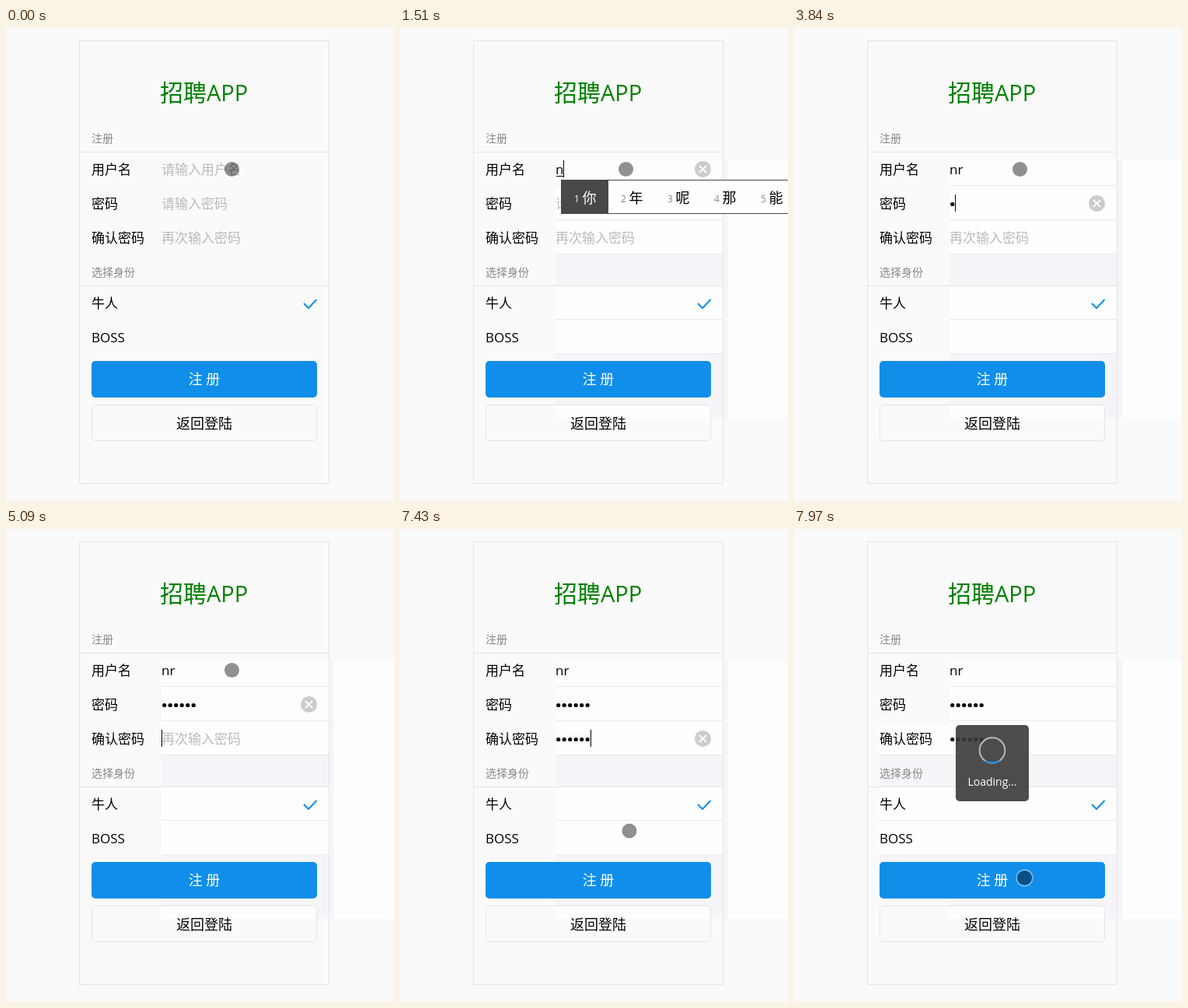
An HTML page for the animation above (8 s loop, 499x608 px).

```html
<!DOCTYPE html>
<html lang="zh-CN">
<head>
<meta charset="utf-8">
<title>注册</title>
<style>
  html, body { margin: 0; width: 100%; height: 100%; overflow: hidden; background: #fafafa; }
  svg { display: block; width: 499px; height: 608px; }
  text { font-family: "Open Sans", "Noto Sans CJK SC", "Noto Sans CJK", sans-serif; font-size: 17px; white-space: pre; }
  .title { font-size: 30px; fill: #008000; }
  .head { font-size: 14px; fill: #888; }
  .hint { fill: #bbb; }
  .button { font-size: 18px; text-anchor: middle; }
  .line { stroke: #ebebeb; }
  .edge { stroke: #e5e5e5; fill: none; }
  .num { font-size: 12px; fill: #888; }
  .word { font-size: 18px; }
  .picked { fill: #fff; }
</style>
</head>
<body>
<svg viewBox="0 0 499 608">
  <defs>
    <clipPath id="repaint">
      <rect x="200" y="170" width="299" height="331"/>
      <rect id="repaintLeft" x="110" y="252" width="90" height="176"/>
    </clipPath>
  </defs>
  <rect width="499" height="608" fill="#fafafa"/>

  <g id="panel" clip-path="url(#repaint)">
    <rect x="95" y="170" width="327" height="331" fill="#f5f5f9"/>
    <path d="M95 170h320v121h-320zM95 332h320v87h-320zM422 170h77v331h-77z" fill="#fefefe"/>
    <path class="line" d="M95 202.5h320M95 246.5h320M95 290.5h320M95 374.5h320M95 418.5h320"/>
    <rect x="110" y="484" width="290" height="47" rx="5" fill="#fefefe"/>
  </g>

  <rect class="edge" x="94.5" y="16.5" width="321" height="569"/>
  <path class="edge" d="M95 159.5h320M95 331.5h320"/>
  <text class="title" x="198" y="94">招聘<tspan font-size="29">APP</tspan></text>
  <text class="head" x="110" y="147">注册</text>
  <text class="head" x="110" y="319">选择身份</text>
  <text x="110" y="188">用户名</text>
  <text x="110" y="232">密码</text>
  <text x="110" y="276">确认密码</text>
  <text x="110" y="360">牛人</text>
  <text x="110" y="404">BOSS</text>
  <path d="M383 354l6 6 10.5-11" fill="none" stroke="#108ee9" stroke-width="2"/>

  <rect id="submit" x="110" y="428" width="290" height="47" rx="5"/>
  <text id="submitText" class="button" x="255" y="458" fill="#fff">注 册</text>
  <rect class="edge" x="110.5" y="484.5" width="289" height="46" rx="4.5"/>
  <text class="button" x="255" y="514.5">返回登陆</text>

  <g id="fields"></g>
  <text id="name" x="200" y="188"></text>
  <path id="underline" stroke="#000"/>
  <rect id="caret" width="1" height="22"/>
  <g id="popup"></g>

  <g id="loading">
    <rect x="208" y="252" width="94" height="98" rx="5" fill="#3a3a3a" fill-opacity=".9"/>
    <g fill="none" stroke-width="2">
      <circle cx="255" cy="284.5" r="16.3" stroke="#b9b9b9"/>
      <path d="M245.6 297.8A16.3 16.3 0 0 0 264.4 297.8" stroke="#108ee9"/>
    </g>
    <text x="255" y="330" text-anchor="middle" fill="#fff" style="font-size:14px">Loading...</text>
  </g>

  <g id="touch">
    <circle r="9.6" fill="#000" fill-opacity=".43"/>
    <circle r="10.4" fill="none" stroke="#fff" stroke-opacity=".4" stroke-width="1.6"/>
  </g>
</svg>
<script>
const LOOP = 8000;
const el = id => document.getElementById(id);
const show = (node, on) => node.setAttribute('visibility', on ? 'visible' : 'hidden');
const within = (t, from, to) => t >= from && t < to;

// Latest value of a [time, value] table
const at = (steps, t) => steps.reduce((value, [time, next]) => t >= time ? next : value, null);

const rowTop = row => 170 + row * 44;
const DOT_STEP = 7.5;
const caretAfter = dots => Math.floor(200 + dots * DOT_STEP);

const typing = [
  [],
  [3690, 4120, 4270, 4520, 4670, 4940],
  [5340, 5620, 5770, 6050, 6330, 6490]
];
const clearIcon = [[1510, 3420], [3840, 5340], [5340, 7970]];
const hintEnd = [1390, 3690, 5340];
const nameText = [[0, ''], [1390, 'n'], [2220, "n'r"], [2770, 'nr']];
const underlineEnd = [[0, 0], [1390, 210], [2220, 221], [2770, 0]];

const dotCarets = row => typing[row].map((time, i) => [time, [caretAfter(i + 1), row]]);
const carets = [
  [120, [200, 0]], [550, null], [1110, [200, 0]], [1390, [210, 0]], [1940, null],
  [2220, [221, 0]], [2770, [217, 0]],
  [3300, [200, 1]], ...dotCarets(1),
  [5090, [200, 2]], ...dotCarets(2),
  [6910, null], [7430, [245, 2]], [7850, null]
];
const touches = [
  [0, [290.5, 181.5]], [7030, [290.5, 196]], [7150, [291, 238]], [7300, [293, 310]],
  [7430, [295, 388]], [7570, [296.5, 448.5]]
];
const candidates = [
  [0, ''], [1390, '你 年 呢 那 能'], [2220, '男人 女人 内容 牛肉'], [2620, '']
];

const hints = ['请输入用户名', '请输入密码', '再次输入密码'];
el('fields').innerHTML = hints.map((hint, row) => {
  const top = rowTop(row);
  const dots = typing[row].map((_, i) =>
    `<circle class="dot" cx="${203.7 + i * DOT_STEP}" cy="${top + 12.5}" r="2.6"/>`).join('');
  return `<g><text class="hint" x="200" y="${top + 18}">${hint}</text>${dots}
    <g class="clear" transform="translate(389.5 ${top + 11.5})">
      <circle r="10.5" fill="#ccc"/>
      <path d="M-4.5-4.5l9 9M4.5-4.5l-9 9" stroke="#fff" stroke-width="1.8"/>
    </g></g>`;
}).join('');
const fields = [...el('fields').children].map(group => ({
  hint: group.querySelector('.hint'),
  dots: [...group.querySelectorAll('.dot')],
  clear: group.querySelector('.clear')
}));

function popupMarkup(list) {
  if (!list) return '';
  const words = list.split(' ');
  const pitch = 42 + 18 * words[0].length;
  return `<rect x="207.5" y="195.5" width="300" height="43" fill="#fefefe" stroke="#4a4846"/>
    <rect x="207" y="195" width="${pitch + 1}" height="44" fill="#4a4846"/>` +
    words.map((word, i) => {
      const x = 224 + i * pitch;
      const picked = i ? '' : ' picked';
      return `<text class="num${picked}" x="${x}" y="224">${i + 1}</text>
        <text class="word${picked}" x="${x + 10.5}" y="225">${word}</text>`;
    }).join('');
}

let shownList = null;
function draw(t) {
  show(el('panel'), t >= 1390);
  el('repaintLeft').setAttribute('width', t >= 7850 ? 90 : 0);

  fields.forEach(({ hint, dots, clear }, row) => {
    show(hint, t < hintEnd[row]);
    show(clear, within(t, ...clearIcon[row]));
    dots.forEach((dot, i) => show(dot, t >= typing[row][i]));
  });

  el('name').textContent = at(nameText, t);
  const end = at(underlineEnd, t);
  el('underline').setAttribute('d', end ? `M201 190.5H${end}` : '');

  const caret = at(carets, t);
  show(el('caret'), caret);
  if (caret) {
    el('caret').setAttribute('x', caret[0]);
    el('caret').setAttribute('y', rowTop(caret[1]));
  }

  const list = at(candidates, t);
  if (list !== shownList) el('popup').innerHTML = popupMarkup(shownList = list);

  const pressed = within(t, 7700, 7850);
  el('submit').setAttribute('fill', pressed ? '#0e80d2' : '#108ee9');
  el('submitText').setAttribute('fill-opacity', pressed ? 0.3 : 1);
  show(el('loading'), t >= 7970);
  el('touch').setAttribute('transform', `translate(${at(touches, t)})`);
}

const start = performance.now();
function tick() {
  draw((performance.now() - start) % LOOP);
  requestAnimationFrame(tick);
}
tick();
</script>
</body>
</html>
```
